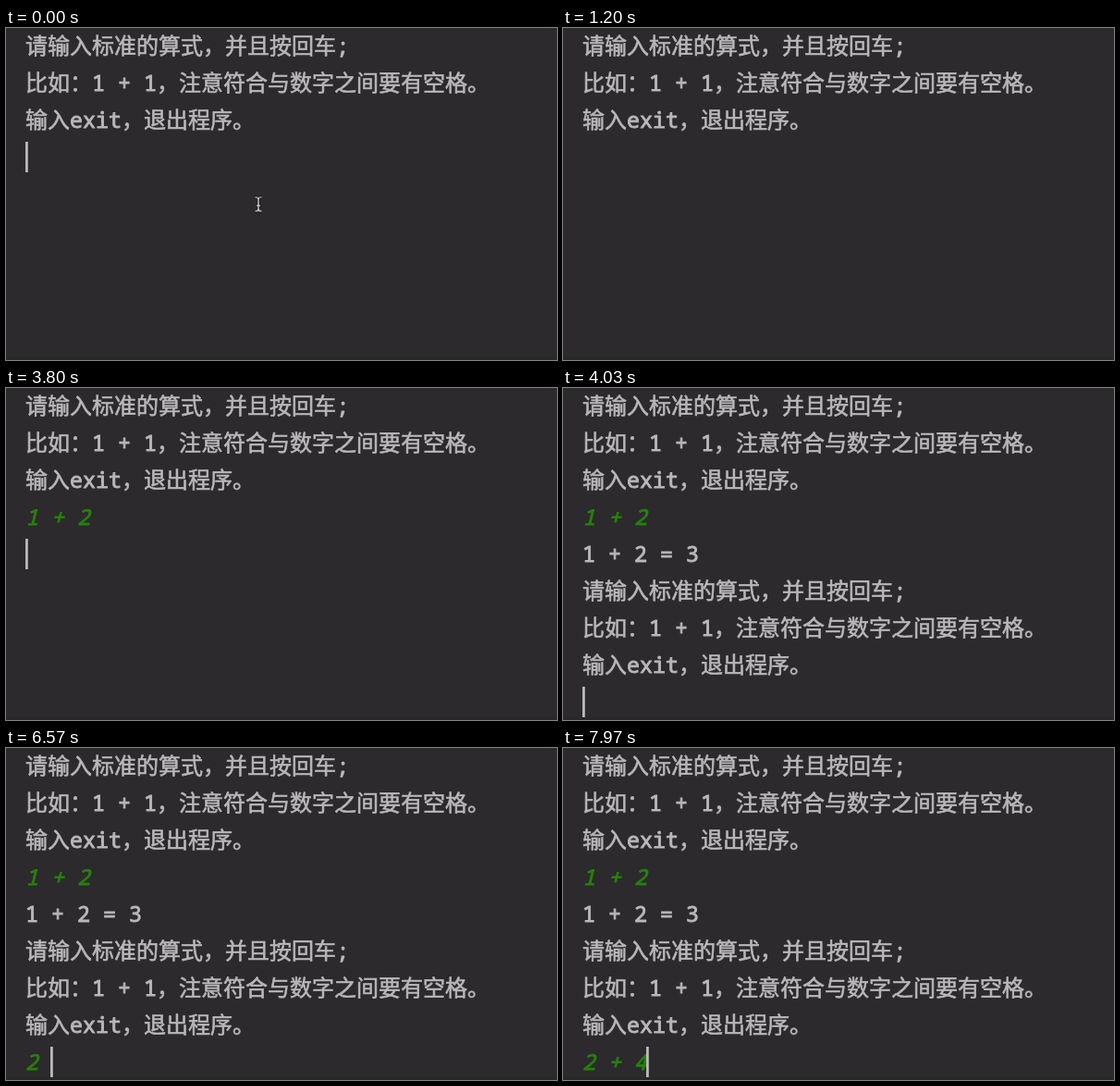
Animation of 596 by 359 pixels, one loop 8 s. Source, as an HTML page:

```html
<!DOCTYPE html>
<html lang="zh-CN">
<head>
<meta charset="utf-8">
<title>算式</title>
<style>
  @property --t { syntax: "<number>"; inherits: true; initial-value: 0; }

  html, body { margin: 0; width: 100%; height: 100%; overflow: hidden; background: #2c2a2c; }
  svg {
    display: block; width: 596px; height: 359px;
    animation: clock 8s linear infinite;
  }
  text {
    font: 500 24px "Noto Sans CJK SC", "Noto Sans CJK", sans-serif;
    fill: #bab8ba; stroke: #bab8ba; stroke-width: .6; white-space: pre;
  }
  .m { font: 500 23.33px "Noto Sans Mono", monospace; stroke-width: .9; }
  .in { font: italic 500 23.33px "Noto Sans Mono", monospace; fill: #26820c; stroke: #26820c; stroke-width: .9; }

  /* visible once the clock (ms) has reached --at */
  .late { opacity: calc(var(--t) - var(--at) + 1); }
  @keyframes clock { from { --t: 0; } to { --t: 8000; } }

  #caret { fill: #bbb9bb; animation: caret 8s step-end infinite; }
  @keyframes caret {
    0%      { opacity: 1; transform: translate(0, 0); }
    2.5%    { opacity: 0; }
    8.75%   { opacity: 1; }
    15%     { opacity: 0; }
    19.125% { opacity: 1; transform: translate(13px, 0); }
    21.25%  { transform: translate(27px, 0); }
    27.5%   { opacity: 0; }
    32.5%   { opacity: 1; transform: translate(41px, 0); }
    35.375% { transform: translate(55px, 0); }
    38.375% { transform: translate(69px, 0); }
    46.25%  { opacity: 0; }
    47.5%   { opacity: 1; transform: translate(0, 40px); }
    50.375% { transform: translate(0, 200px); }
    58.75%  { opacity: 0; }
    65%     { opacity: 1; }
    71.25%  { opacity: 0; }
    77.5%   { opacity: 1; }
    79.125% { transform: translate(13px, 200px); }
    82.125% { transform: translate(27px, 200px); }
    86.25%  { transform: translate(41px, 200px); }
    88.375% { transform: translate(55px, 200px); }
    96.25%  { opacity: 0; }
    99.625%, 100% { opacity: 1; transform: translate(69px, 200px); }
  }

  #mouse { fill: none; animation: mouse 8s step-end infinite; }
  @keyframes mouse {
    0%     { opacity: 1; transform: translate(273px, 190.5px); }
    .375%  { transform: translate(302px, 189px); }
    .875%  { transform: translate(396px, 182px); }
    1.625% { transform: translate(524px, 172px); }
    2.5%, 100% { opacity: 0; transform: translate(524px, 172px); }
  }
</style>
</head>
<body>
<svg viewBox="0 0 596 359">
  <defs>
    <path id="beam" d="M-3.5 -7.5Q0 -7.5 0 -5.5Q0 -7.5 3.5 -7.5M0 -5.5V5.5M-3.5 7.5Q0 7.5 0 5.5Q0 7.5 3.5 7.5M-2 1.5H2"/>
  </defs>
  <rect y="356" width="596" height="3" fill="#292729"/>

  <g id="prompt">
    <text x="21" y="28">请输入标准的算式，并且按回车<tspan class="m">;</tspan></text>
    <text x="21" y="68">比如：<tspan class="m">1 + 1</tspan>，注意符合与数字之间要有空格。</text>
    <text x="21" y="108">输入<tspan class="m">exit</tspan>，退出程序。</text>
  </g>

  <text class="in late" style="--at:1530" x="21" y="148">1</text>
  <text class="in late" style="--at:2600" x="49" y="148">+</text>
  <text class="in late" style="--at:3070" x="77" y="148">2</text>

  <g class="late" style="--at:4030">
    <text class="m" x="21" y="188">1 + 2 = 3</text>
    <use href="#prompt" y="200"/>
  </g>

  <text class="in late" style="--at:6330" x="21" y="348">2</text>
  <text class="in late" style="--at:6900" x="49" y="348">+</text>
  <text class="in late" style="--at:7970" x="77" y="348">4</text>

  <rect id="caret" x="21" y="123" width="2.8" height="33"/>
  <g id="mouse">
    <use href="#beam" stroke="#111" stroke-width="3"/>
    <use href="#beam" stroke="#eee" stroke-width="1.2"/>
  </g>
</svg>
</body>
</html>
```
